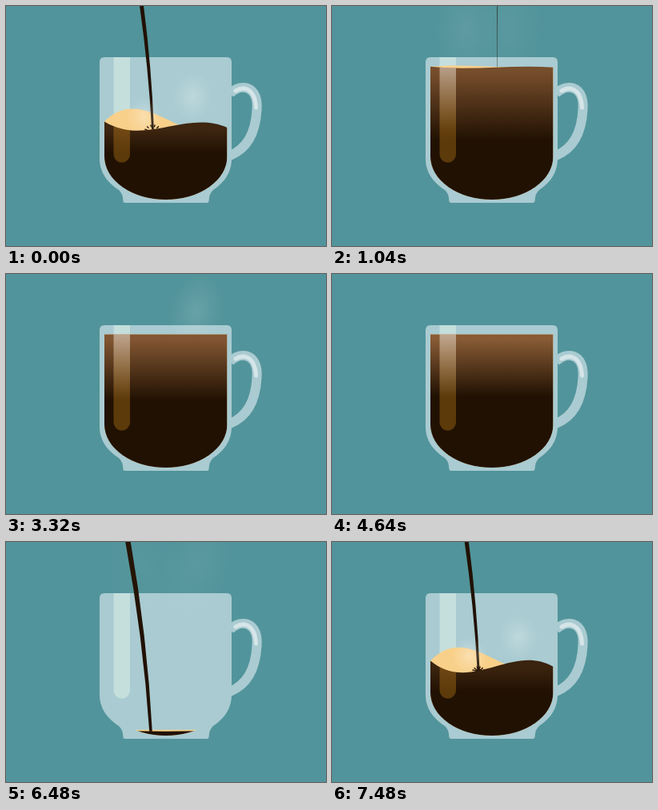
These frames come from a looping animation (400x300 px, 7520 ms). An HTML page with a canvas:

```html
<!DOCTYPE html>
<html lang="en">
<head>
<meta charset="utf-8">
<title>Coffee cup</title>
<style>
html, body { margin: 0; width: 100%; height: 100%; overflow: hidden; background: #52949b; }
canvas { display: block; width: 400px; height: 300px; }
</style>
</head>
<body>
<canvas id="stage" width="400" height="300"></canvas>
<script>
const ctx = document.getElementById('stage').getContext('2d');
const LOOP = 7520, START = -1720, POUR_START = -1290, POUR_END = 1140;
const BACKGROUND = '#52949b', GLASS = '#a9cbd1', CREMA = '#f8d08a';
const DARK = [33, 17, 2], BROWN = [142, 95, 56];
const LEFT = 123, WIDTH = 153.5, FULL = 75.5, EMPTY = 242;

const cup = new Path2D('M117 70Q117 64 123 64H276Q282 64 282 70V191C282 212 268 224 259 230Q254 234 253.5 244Q253.5 246 251 246H149Q146.500 246 146.500 244Q146 234 141 230C132 224 117 212 117 191Z');
const inside = new Path2D('M123 70H276.500V188A76.750 54 0 0 1 123 188Z');
const handle = new Path2D('M280 109C288 102 296 101 301 102.500C312 106 314.500 118 313.500 130C312 157 302 178 280 187');
const handleShine = new Path2D('M287 106C292 103 297 102.500 301 104C308 107 312 115 312.500 127');
const band = new Path2D('M134.500 64H155V185.500A10.250 10.250 0 0 1 134.500 185.500Z');

// Steam puffs: birth time, x, tilt.
const puffs = [[-250, 168, 0], [-450, 226, .1], [2400, 232, .25], [4750, 178, -.15], [5000, 242, .3]];

const clamp = v => Math.max(0, Math.min(1, v));
const ease = v => (v = clamp(v), v * v * (3 - 2 * v));
const mix = (a, b, k) => a + (b - a) * k;
const rgb = parts => `rgb(${parts})`;

function coffeeLevel(time) {
  const filled = ease((time + 1350) / 2490);
  const left = 1 - ease((time + 1680) / 430);
  return mix(EMPTY, FULL, filled + left);
}

// Front and back edges of the surface slosh against each other while pouring.
function surfaces(time) {
  const level = coffeeLevel(time);
  const swell = Math.sin(Math.PI * clamp((time + 700) / 1800));
  const angle = (time + 78) * .01112;
  const dip = 18 * ease((level - 180) / 40) * ease((EMPTY - level) / 30);
  const front = 46 * swell * Math.cos(angle);
  const back = 62 * swell * Math.cos(angle - .5);
  const left = level - 4 * swell, right = level + 4 * swell;
  return {
    level,
    coffee: [left, level + front + dip, level - front * .68 + dip, right],
    crema: [left, level - back, level + back * .65, right]
  };
}

function surfacePath([a, b, c, d]) {
  const path = new Path2D();
  path.moveTo(LEFT, a);
  path.bezierCurveTo(LEFT + WIDTH / 3, b, LEFT + WIDTH * 2 / 3, c, LEFT + WIDTH, d);
  path.lineTo(LEFT + WIDTH, 260);
  path.lineTo(LEFT, 260);
  return path;
}

function heightAt([a, b, c, d], x) {
  const p = (x - LEFT) / WIDTH, q = 1 - p;
  return a * q ** 3 + 3 * b * q * q * p + 3 * c * q * p * p + d * p ** 3;
}

function fade(y0, y1, from, to) {
  const g = ctx.createLinearGradient(0, y0, 0, y1);
  g.addColorStop(0, from);
  g.addColorStop(1, to);
  return g;
}

function fill(path, style) {
  ctx.fillStyle = style;
  ctx.fill(path);
}

function stroke(path, style, width, cap = 'butt') {
  ctx.strokeStyle = style;
  ctx.lineWidth = width;
  ctx.lineCap = cap;
  ctx.stroke(path);
}

function drawCup() {
  stroke(handle, GLASS, 12);
  stroke(handleShine, '#d5e5e8', 5, 'round');
  fill(cup, GLASS);
  fill(band, '#c5dfdd');
}

function drawCrema(crema) {
  ctx.save();
  ctx.clip(inside);
  fill(surfacePath(crema), CREMA);
  ctx.restore();
}

function drawStream(time, top, bottom, end) {
  const fall = clamp((time - POUR_START) / 160);
  const w = Math.min(6.5, 5 - time * .0042) / 2, tip = w * .55;
  const x = mix(top, bottom, fall), y = end * fall, bend = mix(top, x, .75);
  ctx.fillStyle = rgb(DARK);
  ctx.beginPath();
  ctx.moveTo(top - w, 0);
  ctx.lineTo(top + w, 0);
  ctx.quadraticCurveTo(bend + w * .8, y / 2, x + tip, y);
  ctx.lineTo(x - tip, y);
  ctx.quadraticCurveTo(bend - w * .8, y / 2, top - w, 0);
  ctx.fill();
}

// Drops fan out from the impact point and fall back behind the front edge.
function drawSplash(time, x, y) {
  const phase = (time / 188 + 10.6) % 1;
  const head = 12 * (1 - (1 - phase) ** 2);
  const tail = Math.max(0, Math.min(head, (phase - .36) * 32));
  const drops = new Path2D();
  for (let i = 0; i < 6; i++) {
    const angle = Math.PI * (.1 + i * .16), c = Math.cos(angle), s = Math.sin(angle) * .8;
    const drop = 7 * phase * phase;
    drops.moveTo(x + c * tail, y - s * tail + drop);
    drops.lineTo(x + c * head, y - s * head + drop);
  }
  stroke(drops, rgb(DARK), 1.5, 'round');
}

function drawPuff(time, [birth, x, tilt]) {
  const age = (time - birth + LOOP) % LOOP, life = 2000;
  if (age > life) return;
  const r = 18 + age / 60;
  const alpha = 8 / r * clamp(age / 150) * (1 - age / life);
  ctx.save();
  ctx.translate(x + 8 * Math.sin(age / 400), 152 - 122 * ease(age / 1200));
  ctx.rotate(tilt);
  ctx.scale(r, r * (1 + age / 2000));
  const g = ctx.createRadialGradient(0, 0, 0, 0, 0, 1);
  g.addColorStop(0, `rgba(255,255,255,${alpha})`);
  g.addColorStop(.5, `rgba(255,255,255,${alpha * .45})`);
  g.addColorStop(1, 'rgba(255,255,255,0)');
  ctx.fillStyle = g;
  ctx.fillRect(-1, -1, 2, 2);
  ctx.restore();
}

// The brown at the surface grows as the cup fills, then clears slowly.
function drawCoffee(time, level, surface) {
  const settled = time < POUR_START ? 1 : clamp(time / 5800);
  const fullness = (EMPTY - level) / (EMPTY - FULL);
  const warmth = .74 * clamp((fullness - .4) / .45) + .26 * settled * fullness;
  const tone = DARK.map((v, i) => mix(v, BROWN[i], warmth));
  const depth = Math.max(172 - 24 * settled, level + 35);
  const path = surfacePath(surface);
  ctx.save();
  ctx.clip(inside);
  fill(path, fade(level + 6, depth, rgb(tone), rgb(DARK)));
  ctx.clip(path);
  fill(band, fade(75, 155, 'rgba(255,255,255,.45)', 'rgba(230,153,29,.3)'));
  ctx.restore();
}

function draw(now) {
  const time = (now - START) % LOOP + START;
  const { level, coffee, crema } = surfaces(time);
  ctx.fillStyle = BACKGROUND;
  ctx.fillRect(0, 0, 400, 300);
  drawCup();
  drawCrema(crema);
  if (time > POUR_START && time < POUR_END) {
    const sway = ease((time + 900) / 2800);
    const bottom = 181 + 42 * sway * sway;
    const impact = Math.min(EMPTY, heightAt(coffee, bottom));
    drawStream(time, 152.5 + 70 * sway, bottom, impact);
    if (time > -1000 && time < 900) drawSplash(time, bottom, impact);
  }
  puffs.forEach(puff => drawPuff(time, puff));
  drawCoffee(time, level, coffee);
}

const begin = performance.now();
function tick() {
  draw(performance.now() - begin);
  requestAnimationFrame(tick);
}
tick();
</script>
</body>
</html>
```
